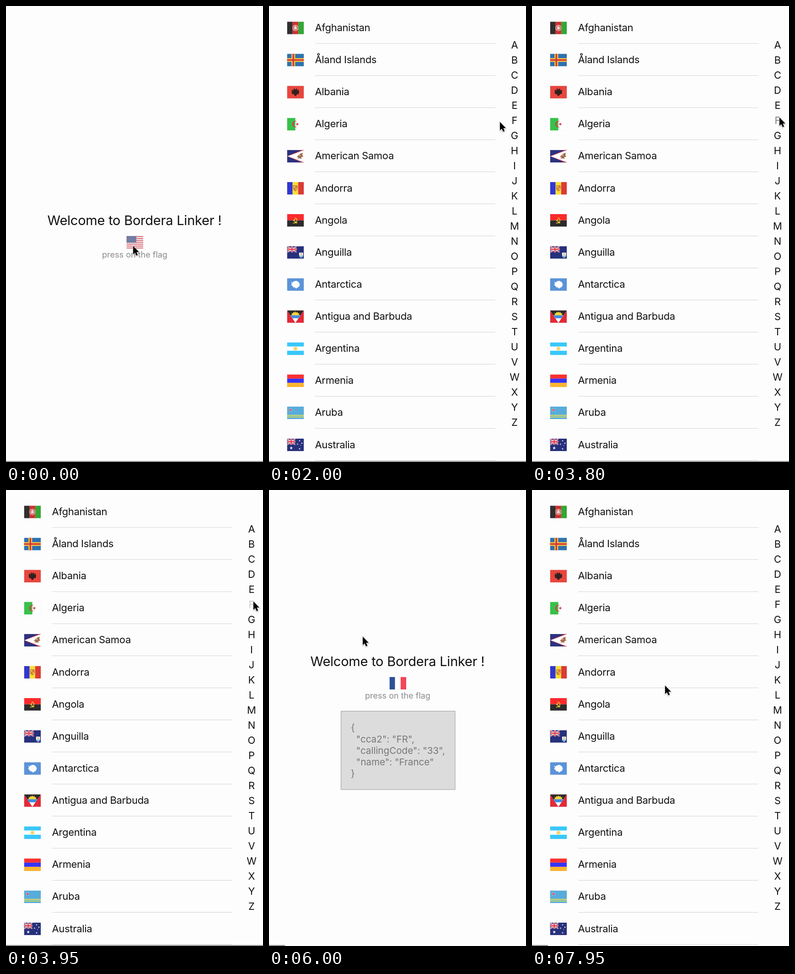
Animation, 562 px wide and 997 px high, one loop 8 s. Source, as an HTML page:

```html
<!DOCTYPE html>
<html lang="en">
<head>
<meta charset="utf-8">
<style>
  html, body { margin: 0; width: 100%; height: 100%; overflow: hidden; background: #fdfdfd; }
  svg { display: block; }
  text { font-family: Inter, Roboto, sans-serif; white-space: pre; }
  .row, .index { font-size: 22px; letter-spacing: -.32px; fill: #111; }
  .mid { text-anchor: middle; }
  .index { letter-spacing: 0; }
  .title { font-size: 29px; letter-spacing: -.23px; fill: #111; }
  .hint { font-size: 18px; fill: #8b8b8b; }
  .json { font-size: 20.6px; fill: #777; }
  #cursor { filter: drop-shadow(0 1.5px 1.5px rgba(0, 0, 0, .35)); }
</style>
</head>
<body>
<svg id="stage" width="562" height="997" viewBox="0 0 562 997">
  <g id="home">
    <g id="head">
      <text class="title mid" x="281" y="478.5">Welcome to Bordera Linker !</text>
      <g id="pick"></g>
      <text class="hint mid" x="281.5" y="550">press on the flag</text>
    </g>
    <g id="info">
      <rect x="157.5" y="483.5" width="249.5" height="171.5" fill="#dcdcdc" stroke="#999"/>
    </g>
  </g>
  <g id="list">
    <g id="rows"></g>
    <g id="letters"></g>
  </g>
  <rect id="edge" y="995" width="562" height="1.5" fill="#666"/>
  <path id="cursor" d="M0 .5V19L4.1 15.2 7 21.8 10.3 20.4 7.5 13.9H13Z" stroke="#fff" stroke-width="1.6" paint-order="stroke"/>
</svg>
<script>
const $ = id => document.getElementById(id);
const LOOP = 8000, PITCH = 70.12;

// Flag pieces on a 36 x 27 field
const rect = (x, y, w, h, c) => `<rect x="${x}" y="${y}" width="${w}" height="${h}" fill="${c}"/>`;
const disc = (x, y, r, c) => `<circle cx="${x}" cy="${y}" r="${r}" fill="${c}"/>`;
const path = (d, c) => `<path d="${d}" fill="${c}"/>`;
const line = (d, c, w) => `<path d="${d}" fill="none" stroke="${c}" stroke-width="${w}"/>`;
const field = c => rect(0, 0, 36, 27, c);
const rows = (...cs) => cs.map((c, i) => rect(0, i * 27 / cs.length, 36, 27 / cs.length, c)).join('');
const cols = (...cs) => cs.map((c, i) => rect(i * 36 / cs.length, 0, 36 / cs.length, 27, c)).join('');
const cross = (x, w, c) => rect(x - w / 2, 0, w, 27, c) + rect(0, 13.5 - w / 2, 36, w, c);
const star = (x, y, r, c) => {
  let d = '';
  for (let i = 0; i < 10; i++) {
    const a = i * Math.PI / 5, q = i % 2 ? r * .4 : r;
    d += `${i ? 'L' : 'M'}${(x + q * Math.sin(a)).toFixed(2)} ${(y - q * Math.cos(a)).toFixed(2)}`;
  }
  return path(d + 'Z', c);
};
const shield = (x, y, w, h, c) => path(`M${x} ${y}h${w}v${h * .5}q0 ${h * .35} ${-w / 2} ${h * .5}q${-w / 2} ${-h * .15} ${-w / 2} ${-h * .5}Z`, c);

// Blue ensign with a canton of width w
const ensign = (bg, w = 18) => {
  const diag = `M0 0L${w} 13.5M${w} 0L0 13.5`, plus = `M${w / 2} 0V13.5M0 6.75H${w}`;
  return field(bg) + `<svg width="${w}" height="13.5">` + rect(0, 0, w, 13.5, '#2d3184') +
    line(diag, '#fff', 2.6) + line(diag, '#e0323f', 1) +
    line(plus, '#fff', 4.2) + line(plus, '#e0323f', 2.4) + '</svg>';
};

const states = () => {
  let s = field('#fff');
  for (let i = 0; i < 13; i += 2) s += rect(0, i * 27 / 13, 36, 27 / 13, '#c9283c');
  s += rect(0, 0, 21, 14.54, '#2a3a72');
  for (let y = 0; y < 9; y++)
    for (let x = y % 2; x < 11; x += 2) s += disc(1.8 + x * 1.74, 1.5 + y * 1.44, .45, '#ccd');
  return s;
};

const tricolor = cols('#2f5096', '#fff', '#f4455a');
const navy = '#27307c';

const flags = {
  'Afghanistan': cols('#2f2f2f', '#cf2f30', '#35a635') + disc(18, 13.5, 6.6, '#e9b5af') +
    disc(18, 13.5, 5.2, '#d25450') + rect(15, 12, 6, 4.6, '#f2d8d4') + disc(18, 11.5, 2.2, '#f2d8d4'),
  'Åland Islands': field('#2f70b0') + cross(13.5, 8, '#f3cf3d') + cross(13.5, 3.6, '#d8383b'),
  'Albania': field('#e8463d') + path('M18 8L15.5 5.5 13.5 7 15 9 13 10 11 7 10 13 11 18 14 17.5 15.5 20 18 22.5 20.5 20 22 17.5 25 18 26 13 25 7 23 10 21 9 22.5 7 20.5 5.5Z', '#34201f'),
  'Algeria': cols('#35c24a', '#fff') +
    path('M22.5 8.1A7 7 0 1 0 22.5 18.9A6 6 0 1 1 22.5 8.1Z', '#e3344b') + star(22, 13.5, 3.8, '#e3344b'),
  'American Samoa': field('#2c327f') + path('M0 13.5L36 -1.5V28.5Z', '#d23a48') + path('M1 13.5L36 .5V26.5Z', '#fff') +
    path('M23 13L28 8 34 6 33 11 35 14 30 16 32 19 26 18 22 20 25 16 21 15Z', '#a06a4c') + disc(27.5, 11.5, 1.6, '#dcb292'),
  'Andorra': cols('#3237ce', '#fbdf35', '#db3b37') + shield(13, 7, 10, 13, '#cf8538') +
    rect(14.5, 8.5, 3, 4, '#e9be4b') + rect(18.5, 13, 3, 4, '#e9be4b'),
  'Angola': rows('#fb2b2c', '#2b2b2b') + line('M16.5 8A5.2 5.2 0 0 1 17 18.3M13 19.5L22 18.3M13 13L21.5 19.5', '#f4d334', 1.5) + star(16.3, 12, 2.3, '#f4d334'),
  'Anguilla': ensign(navy, 21) + shield(26, 14, 8.5, 11, '#fff') + path('M26.3 20H34.2Q33 23.5 30.2 24.6 27 23 26.3 20Z', '#65bfd0') + disc(30.2, 17, 1.8, '#ec9a43'),
  'Antarctica': field('#5b93d9') + path('M9 7L12 9.5 14 7 20 5.5 25 8 27.5 13 26 18 22 20.5 19 22.5 17.5 20 13.5 19.5 11 16 8.5 14 10.5 12Z', '#fff'),
  'Antigua and Barbuda': field('#e32a38') + path('M0 0H36L18 27Z', '#fff') + path('M0 0H36L29 10.8H7Z', '#2b2b2b') +
    path('M18 2L19.6 5 22.5 3.2 23 6.4 26.5 6 25.2 9 28 10.8H8L10.8 9 9.5 6 13 6.4 13.5 3.2 16.4 5Z', '#fbd43a') + path('M7.2 10.8H28.8L24.5 17.2H11.5Z', '#3c8fe2'),
  'Argentina': rows('#37c8fb', '#fff', '#37c8fb') + disc(18, 13.5, 4.6, '#fae39a') + disc(18, 13.5, 2.6, '#f6cf58'),
  'Armenia': rows('#fb3131', '#3434fb', '#fcb531'),
  'Aruba': field('#58acdb') + rect(0, 18, 36, 1.8, '#e9e24f') + rect(0, 21.6, 36, 1.8, '#e9e24f') + star(7.5, 7.3, 4.6, '#fff') + star(7.5, 7.3, 3.7, '#dc3c50'),
  'Australia': ensign(navy) + star(9, 20.3, 3.6, '#fff') + star(27, 4.6, 2, '#fff') + star(22.5, 12, 2, '#fff') +
    star(32, 10, 2, '#fff') + star(27, 22, 2.1, '#fff') + star(29.3, 14.5, 1.1, '#fff'),
  'Falkland Islands': ensign(navy) + disc(27.5, 13, 6.2, '#d5dfdc') + shield(23.5, 8, 8, 11, '#5fa0d0') +
    rect(24.5, 9, 6, 3.5, '#f0f0e4') + rect(22, 20, 11, 2.2, '#d6cf9c'),
  'Faroe Islands': field('#fff') + cross(13.5, 6.4, '#3b65ad') + cross(13.5, 3.2, '#ea3a46'),
  'Fiji': ensign('#6bbdf1', 21) + shield(22.5, 10, 10.5, 15, '#fff') + rect(22.5, 10, 10.5, 4, '#e24a3d') +
    line('M27.75 14V24.5M23 18.5H32.5', '#e24a3d', 1.5) + disc(25, 16.5, 1.1, '#d8a544') + disc(30.4, 20.5, 1.1, '#d8a544'),
  'Finland': field('#fff') + cross(13.5, 7.2, '#2f80e2'),
  'France': tricolor,
  'French Guiana': tricolor,
  'French Polynesia': field('#e3463a') + rect(0, 6.75, 36, 13.5, '#fff') + disc(18, 13.5, 5.8, '#f0ae55') +
    path('M12.2 13.5A5.8 5.8 0 0 0 23.8 13.5Z', '#4b7fc4') + rect(15.3, 11.5, 5.4, 5, '#a9493e'),
  'French Southern and Antarctic Lands': tricolor,
  'Gabon': rows('#55ad31', '#fce62f', '#3488c9'),
  'Gambia': field('#fff') + rect(0, 0, 36, 9, '#fb2c35') + rect(0, 10.3, 36, 6.6, '#3136ad') + rect(0, 18.3, 36, 8.7, '#32ab33'),
  'Georgia': field('#fff') + cross(18, 5, '#fb3233') +
    [[7.7, 5.5], [28.3, 5.5], [7.7, 21.5], [28.3, 21.5]].map(([x, y]) => line(`M${x - 2.6} ${y}h5.2M${x} ${y - 2.6}v5.2`, '#f4585a', 1.6)).join(''),
  'Germany': rows('#303030', '#fb2d25', '#fdd72a'),
  'Ghana': rows('#e83340', '#fcec43', '#3f9761') + star(18, 13.8, 5.6, '#2b2b26'),
  'Gibraltar': field('#fff') + rect(0, 20.2, 36, 6.8, '#e23b45') +
    path('M8 18.5V10H7V7H12V9H13.5V6H15V4H21V6H22.5V9H24V7H29V10H28V18.5Z', '#d5363c') +
    line('M13.2 10V18M22.8 10V18', '#f1a4a4', .8) + line('M18 18V25H20', '#f4cf55', 1.4)
};

// Countries that only pass by while the list scrolls
const passing = 'Austria|Azerbaijan|Bahamas|Bahrain|Bangladesh|Barbados|Belarus|Belgium|Belize|Benin|Bermuda|Bhutan|Bolivia|Botswana|Brazil|Brunei|Bulgaria|Burkina Faso|Burundi|Cambodia|Cameroon|Canada|Cape Verde|Chad|Chile|China|Colombia|Comoros|Costa Rica|Croatia|Cuba|Cyprus|Denmark|Djibouti|Dominica|Ecuador|Egypt|El Salvador|Eritrea|Estonia|Ethiopia'.split('|');
const palette = ['#d8383b', '#fff', '#35a24a', '#fbdf35', '#2f5fb0', '#303030'];
const stripes = i => {
  const pick = k => palette[(i * k + k) % palette.length];
  return (i % 3 ? rows : cols)(pick(1), pick(5), pick(7));
};

const known = Object.keys(flags);
const names = [...known.slice(0, 14), ...passing, ...known.slice(14)];
const SCROLL = (14 + passing.length) * PITCH + 16;

const flagAt = (x, y, art) => `<svg x="${x}" y="${y}" width="36.5" height="27.4" viewBox="0 0 36 27">${art}` +
  `<rect width="36" height="27" fill="none" stroke="#000" stroke-opacity=".07"/></svg>`;

$('rows').innerHTML = names.map((name, i) => {
  const y = i * PITCH;
  return `<g transform="translate(0 ${y.toFixed(2)})"><g class="cell">${flagAt(39.5, 34.3, flags[name] || stripes(i))}` +
    `<text class="row" x="100.5" y="55">${name}</text></g>${rect(101, 81.5, 394, 1, '#d3d3d5')}</g>`;
}).join('');

$('letters').innerHTML = [...'ABCDEFGHIJKLMNOPQRSTUVWXYZ'].map((c, i) =>
  `<text class="index mid" x="537" y="${93 + i * 33}">${c}</text>`).join('');

$('info').innerHTML += ['{', '  "cca2": "FR",', '  "callingCode": "33",', '  "name": "France"', '}'].map((s, i) =>
  `<text class="json" x="179" y="${526.5 + i * 25}">${s}</text>`).join('');

$('pick').innerHTML = `<g id="us">${flagAt(263.5, 502.8, states())}</g><g id="fr">${flagAt(263.5, 502.8, tricolor)}</g>`;

const letterF = $('letters').children[5];
const cellFrance = $('rows').children[names.indexOf('France')].firstChild;

// time, x, y
const track = [
  [0, 278, 524], [1400, 278, 524], [2150, 531, 222], [2850, 546, 190], [3600, 541, 243], [3950, 541, 243],
  [4550, 282, 276], [5150, 205, 320], [6250, 205, 320], [7080, 291, 427], [LOOP, 291, 427]
];

const ramp = (t, from, span) => Math.min(1, Math.max(0, (t - from) / span));
const smooth = k => k * k * (3 - 2 * k);
const press = (t, down, up, span = 250) => 1 - .8 * (ramp(t, down, 150) - ramp(t, up, span));
const show = (id, on) => $(id).setAttribute('display', on ? 'inline' : 'none');

function cursorAt(t) {
  const i = track.findIndex(p => p[0] > t);
  const [t0, x0, y0] = track[i - 1], [t1, x1, y1] = track[i];
  const k = smooth((t - t0) / (t1 - t0));
  return [x0 + (x1 - x0) * k, y0 + (y1 - y0) * k];
}

function draw(t) {
  const listing = t >= 1150 && t < 5750 || t >= 7800;
  const chosen = t >= 5750;
  show('list', listing);
  show('home', !listing);
  show('info', chosen);
  show('us', !chosen);
  show('fr', chosen);
  $('head').setAttribute('transform', `translate(0 ${chosen ? -94 : 0})`);
  $('pick').setAttribute('opacity', chosen ? press(t, 7080, 7600, 50) : press(t, -55, 330));
  letterF.setAttribute('opacity', press(t, 3710, 3950));
  cellFrance.setAttribute('opacity', press(t, 5200, 5450));
  const k = t < 7800 ? smooth(ramp(t, 4000, 300)) : 0;
  $('rows').setAttribute('transform', `translate(0 ${-SCROLL * k})`);
  $('edge').setAttribute('width', t < 4000 ? 562 : 35);
  $('cursor').setAttribute('transform', `translate(${cursorAt(t)})`);
}

const start = performance.now();
function tick() {
  draw((performance.now() - start) % LOOP);
  requestAnimationFrame(tick);
}
tick();
</script>
</body>
</html>
```
